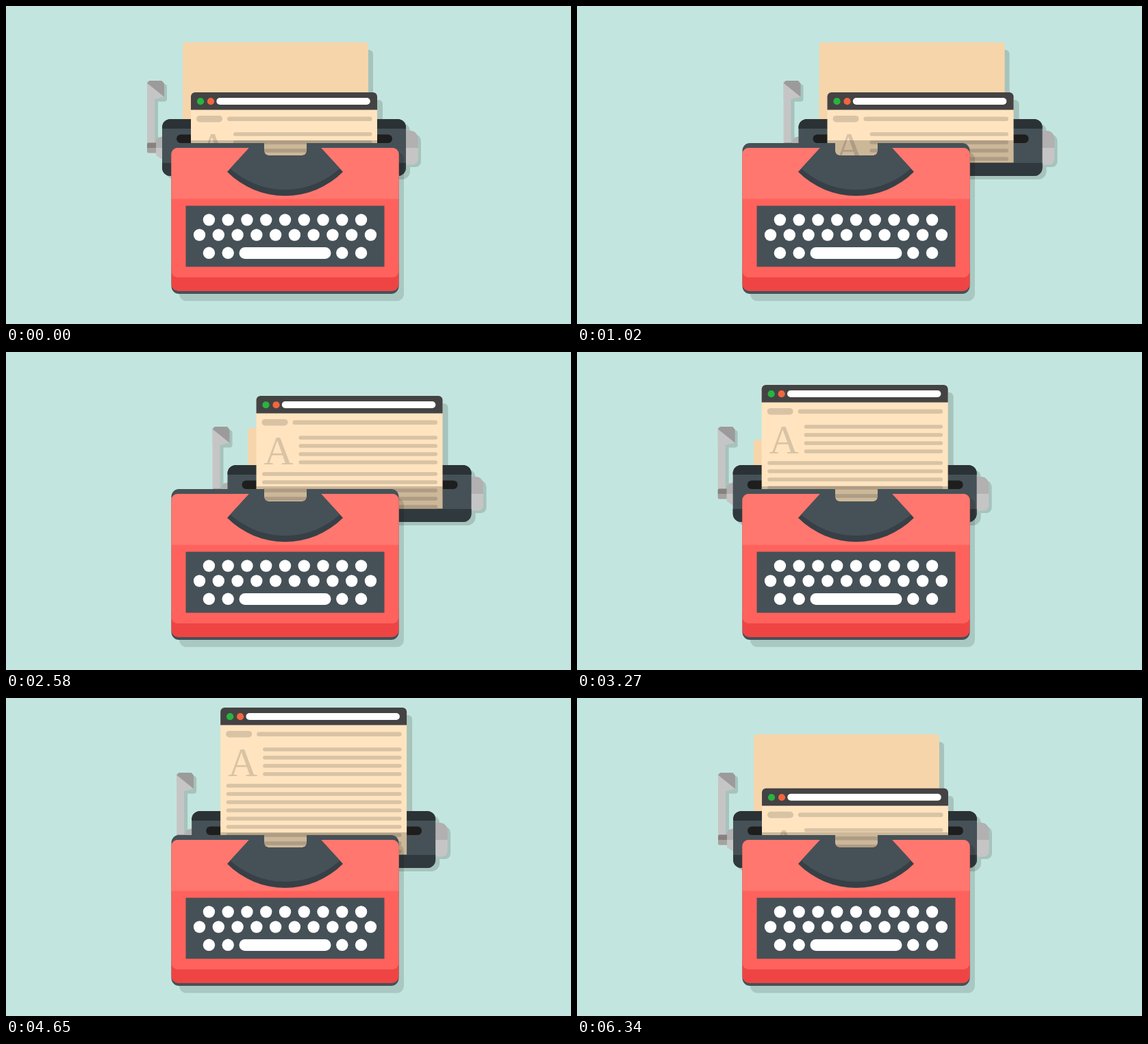
Write an HTML page with a canvas that moves like this. It is 825 px wide and 464 px high and loops after 6370 ms.

```html
<!DOCTYPE html>
<html lang="en">
<head>
<meta charset="utf-8">
<title>Typewriter</title>
<style>
  html, body { margin: 0; width: 100%; height: 100%; overflow: hidden; background: #c2e6df; }
  canvas { display: block; width: 825px; height: 464px; }
</style>
</head>
<body>
<canvas id="stage" width="825" height="464"></canvas>
<script>
const W = 825, H = 464, LOOP = 6370;
const ctx = document.getElementById('stage').getContext('2d');

const C = {
  bg: '#c2e6df', shadow: '#a6c3bc', slate: '#455157', slateTop: '#2b3235', slateLow: '#30393d',
  black: '#1e1e1e', sheet: '#f6d5ab', page: '#ffe4bf', ink: '#d9c3a5', bar: '#444344',
  steel: '#c6c5c5', steelMid: '#b2b0b0', steelDark: '#9c9b9b',
  red: '#ff625c', redLight: '#ff776f', redDark: '#ef4444'
};

// Each typed line: when it starts, when it ends, how far the page then rises.
const typed = [
  { start: 305, end: 865, lift: 43 },
  { start: 1275, end: 2253, lift: 35 },
  { start: 2706, end: 3832, lift: 34 },
  { start: 4288, end: 4950, lift: 0 }
];
const SWING = 95.5, RETURN = 155, FEED_LAG = 180, PULL = 5330, PULLED = 5830;
const PAGE_X = 270, PAGE_W = 272, PAGE_H = 231, PAGE_REST = 126, SHEET_REST = 53;

const ramp = (t, a, b) => Math.min(1, Math.max(0, (t - a) / (b - a)));

// Carriage offset, page top and back sheet top at time t.
function pose(t) {
  const last = typed.length - 1;
  let x = 0, page = PAGE_REST, sheet = SHEET_REST;
  typed.forEach(({ start, end, lift }, i) => {
    const travel = i === 0 || i === last ? SWING : 2 * SWING;
    x -= travel * ramp(t, start, end);
    if (i === last) return;
    x += 2 * SWING * ramp(t, end, end + RETURN);
    const feed = ramp(t, end + FEED_LAG, typed[i + 1].start);
    page -= lift * feed;
    sheet += 37.5 * feed;
  });
  if (t > PULL) {
    page -= 0.54 * (t - PULL);
    sheet = Math.min(SHEET_REST, SHEET_REST - 0.5 * (6134 - t));
  }
  if (t > PULLED) page = Math.min(230, PAGE_REST + 0.2 * (LOOP - t));
  return { x, page, sheet };
}

function rect(x, y, w, h, color, r = 0) {
  ctx.fillStyle = color;
  ctx.beginPath();
  ctx.roundRect(x, y, w, h, r);
  ctx.fill();
}

function poly(color, ...p) {
  ctx.fillStyle = color;
  ctx.beginPath();
  for (let i = 0; i < p.length; i += 2) ctx.lineTo(p[i], p[i + 1]);
  ctx.closePath();
  ctx.fill();
}

function dot(x, y, r, color) {
  ctx.fillStyle = color;
  ctx.beginPath();
  ctx.arc(x, y, r, 0, Math.PI * 2);
  ctx.fill();
}

function line(x0, x1, y, h) {
  rect(x0, y - h / 2, x1 - x0, h, C.ink, h / 2);
}

function group(x, y, draw) {
  ctx.save();
  ctx.translate(x, y);
  draw();
  ctx.restore();
}

function clipAbove(y, draw) {
  ctx.save();
  ctx.beginPath();
  ctx.rect(0, 0, W, y);
  ctx.clip();
  draw();
  ctx.restore();
}

function backSheet() {
  rect(261, 11, 275, PAGE_H, C.shadow, 6);
  rect(258, 0, 271, PAGE_H, C.sheet, 5);
}

function lever() {
  // shadow
  rect(211, 115, 11, 85, C.shadow, 3);
  rect(211, 114, 24, 25.5, C.shadow, 4);
  // arm and handle
  rect(206, 109, 11, 98, C.steel, [4, 0, 0, 0]);
  poly(C.steel, 206, 112, 231, 132.5, 217, 136, 206, 136);
  poly(C.steelDark, 206, 112.5, 209.5, 109, 227.5, 109, 231, 113, 231, 132.5);
  // axle
  poly(C.steelMid, 219, 196, 222, 192, 230, 190, 230, 207, 219, 207);
  poly(C.steel, 219, 207, 230, 207, 230, 225, 219, 218);
  rect(206, 199.5, 13, 8, '#858280', [2, 0, 0, 0]);
  rect(206, 207, 13, 7.5, '#a5a2a0', [0, 0, 0, 2]);
}

function knob() {
  rect(586, 187, 20, 48, C.shadow, [0, 10, 8, 0]);
  rect(576, 182, 25.5, 25, C.steelMid, [0, 11, 0, 0]);
  rect(576, 207, 25.5, 24.5, C.steel, [0, 0, 8, 0]);
}

function carriage() {
  rect(234, 171, 356, 82, C.shadow, 12);
  lever();
  knob();
  rect(228, 165, 356, 83, C.slate, 12);
  rect(228, 165, 356, 14, C.slateTop, [12, 12, 0, 0]);
  rect(228, 229, 356, 19, C.slateLow, [0, 0, 12, 12]);
  for (const x of [270.5, 541.5]) rect(x, 165, 1, 14, '#252b2e');
  rect(249, 187.5, 315, 12.5, C.black, 6.25);
  rect(271, 194, 271, 16, C.black);
  rect(271, 210, 271, 18.5, '#383634');
}

function page() {
  rect(0, 0, PAGE_W, PAGE_H, C.page, 6);
  rect(0, 0, PAGE_W, 25.5, C.bar, [6, 6, 0, 0]);
  dot(14, 13.2, 5.1, '#28b43e');
  dot(29, 13.2, 5.1, '#f2653f');
  rect(37.3, 8, 224.5, 10, '#fff', 5);
  line(8, 46, 38.7, 9.5);
  line(53, 264.5, 38.7, 6.5);
  for (let i = 0; i < 4; i++) line(62, 264.5, 61 + 12 * i, 5.6);
  for (let i = 0; i < 9; i++) line(8.5, 264.5, 114 + 12 * i, 5.6);
  ctx.fillStyle = C.ink;
  ctx.font = '60px "Liberation Serif", serif';
  ctx.textAlign = 'center';
  ctx.fillText('A', 32.5, 100);
}

function frontPage(x, y) {
  clipAbove(228.5, () => {
    group(x, y, page);
    // shade where the page dips behind the body
    const top = Math.max(196, y), bottom = y + PAGE_H;
    if (bottom > top) rect(x, top, PAGE_W, bottom - top, 'rgba(0,0,0,.2)');
  });
}

function fan() {
  const r = 119.5, cx = 407.5, cy = 157.5, side = r * Math.SQRT1_2;
  ctx.save();
  ctx.beginPath();
  ctx.moveTo(cx - 51.5, 206);
  ctx.lineTo(cx + 51.5, 206);
  ctx.lineTo(cx + side, cy + side);
  ctx.arc(cx, cy, r, Math.PI / 4, Math.PI * 3 / 4);
  ctx.closePath();
  ctx.fillStyle = '#364046';
  ctx.fill();
  ctx.clip();
  dot(cx, cy - 9, r, C.slate);
  ctx.restore();
}

function keys() {
  rect(262.5, 291.5, 290, 89, C.slate);
  const key = (col, y) => dot(296.4 + 27.77 * col, y, 8.7, '#fff');
  for (let i = 0; i < 9; i++) key(i, 312);
  for (let i = 0; i < 10; i++) key(i - 0.5, 334);
  for (const i of [0, 1, 7, 8]) key(i, 360.3);
  rect(340.5, 352, 134, 17, '#fff', 8.5);
}

function body() {
  const x = 241.5, w = 332;
  ctx.save();
  // the notch stays open so the carriage shows through
  ctx.beginPath();
  ctx.rect(0, 0, W, H);
  ctx.roundRect(377, 199, 62, 19, [0, 0, 6, 6]);
  ctx.clip('evenodd');
  rect(253, 213, 328, 217.5, 'rgba(0,0,0,.13)', 10);
  rect(x, 200, w, 220, C.slate, 11);
  rect(x, 380, w, 36, C.redDark, [0, 0, 10, 10]);
  rect(x, 207, w, 189, C.red, 9);
  rect(x, 207, w, 74.5, C.redLight, [9, 9, 0, 0]);
  fan();
  ctx.restore();
  keys();
}

function draw(t) {
  const p = pose(t), px = p.x + PAGE_X;
  rect(0, 0, W, H, C.bg);
  // papers standing behind the roller
  clipAbove(195, () => {
    group(p.x, p.sheet, backSheet);
    rect(px + 8, p.page + 11, PAGE_W, PAGE_H, C.shadow, 6);
  });
  group(p.x, 0, carriage);
  frontPage(px, p.page);
  body();
}

function tick() {
  draw(performance.now() % LOOP);
  requestAnimationFrame(tick);
}
tick();
</script>
</body>
</html>
```
